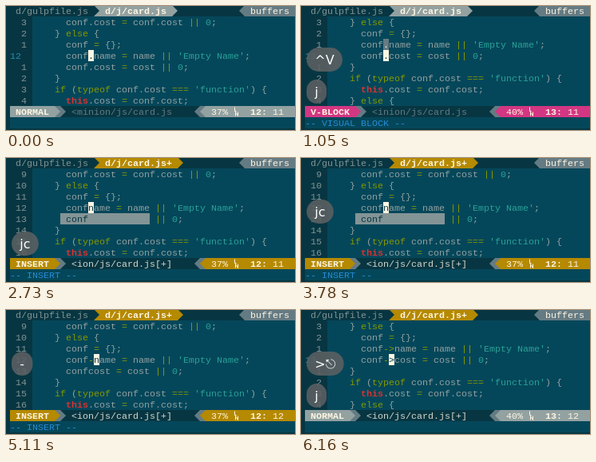
Animation, 362 px wide and 155 px high, one loop 7700 ms. Source, as an HTML page with a canvas:

```html
<!DOCTYPE html>
<html lang="en">
<head>
<meta charset="utf-8">
<title>Block editing in a terminal</title>
<style>
  html, body { margin: 0; width: 100%; height: 100%; overflow: hidden; background: #073642; }
  canvas { display: block; }
</style>
</head>
<body>
<canvas id="stage" width="362" height="155"></canvas>
<script>
const ctx = document.getElementById('stage').getContext('2d');
const W = 362, H = 155, CELL = 7, ROW = 14, LEFT = 5, LOOP = 7700;
const MONO = '"Liberation Mono", "DejaVu Sans Mono", monospace';
const KEYS = '16px "DejaVu Sans", sans-serif';
const C = {
  bg: '#05475a', dark: '#073642', text: '#93a1a1', num: '#839496', curNum: '#268bb2',
  op: '#859900', str: '#2aa198', self: '#dc322f', white: '#fdf6e3', grey: '#657b83',
  pale: '#93a1a1', gold: '#b58900', pink: '#d33682', blue: '#268bd2'
};
const MODE_COLOR = { 'NORMAL': C.pale, 'V-BLOCK': C.pink, 'INSERT': C.gold };

// Each step overrides part of the previous state.
const steps = [
  { at: 0, mode: 'NORMAL', cur: 12, col: 11, join: ['.', '.'], file: '<minion/js/card.js',
    msg: '', dirty: false, menu: false, up: '', low: '' },
  { at: 490, mode: 'V-BLOCK', file: '<inion/js/card.js', msg: '-- VISUAL BLOCK --', low: '^V' },
  { at: 980, up: '^V', low: '' },
  { at: 1050, cur: 13, low: 'j' },
  { at: 2310, low: 'jc' },
  { at: 2380, mode: 'INSERT', cur: 12, join: ['', ''], file: '<ion/js/card.js[+]',
    msg: '-- INSERT --', dirty: true, menu: true },
  { at: 2590, fade: 3 },
  { at: 3780, up: 'jc', low: '', fade: 0 },
  { at: 3850, col: 12, join: ['-', ''], menu: false, low: '-' },
  { at: 4410, fade: 4 },
  { at: 5110, up: '-', low: '', fade: 0 },
  { at: 5180, col: 13, join: ['->', ''], low: '>' },
  { at: 5600, low: '>⎋' },
  { at: 5670, msg: '', shift: -1 },
  { at: 5880, mode: 'NORMAL', col: 12, shift: 0, join: ['->', '->'], fade: 4 },
  { at: 6090, up: '>⎋', low: '', fade: 0 },
  { at: 6160, cur: 13, low: 'j' }
];

function stateAt(t) {
  const s = {};
  for (const step of steps) {
    if (step.at > t) break;
    Object.assign(s, step);
  }
  const done = Math.floor((t - s.at) / 70) + 1;
  s.upAlpha = s.fade ? Math.max(0, 1 - done / s.fade) : 1;
  return s;
}

const colX = col => LEFT + col * CELL;
const rowY = row => row * ROW - 1;

function fill(color, col, row, cells) {
  ctx.fillStyle = color;
  ctx.fillRect(colX(col), rowY(row), cells * CELL, ROW);
}

function print(str, col, row, color, bold) {
  ctx.font = (bold ? 'bold ' : '') + '11.667px ' + MONO;
  ctx.fillStyle = color;
  ctx.fillText(str, colX(col), rowY(row) + 11);
}

// Powerline separator: dir 1 points right, -1 points left.
function arrow(col, row, color, back, dir) {
  fill(back, col, row, 1);
  const base = dir > 0 ? colX(col) : colX(col + 1), y = rowY(row);
  ctx.fillStyle = color;
  ctx.beginPath();
  ctx.moveTo(base, y);
  ctx.lineTo(base + dir * CELL, y + ROW / 2);
  ctx.lineTo(base, y + ROW);
  ctx.fill();
}

function sourceLines(join) {
  return [
    '      conf.cost = conf.cost || 0;',
    '    } else {',
    '      conf = {};',
    `      conf${join[0]}name = name || 'Empty Name';`,
    `      conf${join[1]}cost = cost || 0;`,
    '    }',
    "    if (typeof conf.cost === 'function') {",
    '      this.cost = conf.cost;',
    '    } else {'
  ];
}

function tokenColor(tok) {
  if (tok[0] === "'" || /^\d/.test(tok)) return C.str;
  if (tok === 'this') return C.self;
  return /^(else|if|typeof|[=|>-]+)$/.test(tok) ? C.op : C.text;
}

function printCode(line, row) {
  const tokens = /'[^']*'|[a-z]+|\d+|[=|>-]+|[^\sa-z\d'=|>-]+/gi;
  for (const m of line.matchAll(tokens)) {
    print(m[0], 4 + m.index, row, tokenColor(m[0]), m[0] === 'this');
  }
}

function block(line, col, row, back, color) {
  fill(back, col + 3, row, 1);
  print(line[col - 1], col + 3, row, color);
}

function drawBuffer(s) {
  const first = s.cur - 3, lines = sourceLines(s.join);
  ctx.fillStyle = C.dark;
  ctx.fillRect(LEFT, rowY(1), 4 * CELL, 8 * ROW);
  for (let row = 1; row <= 8; row++) {
    const n = first + row - 1, here = n === s.cur;
    const relative = s.mode !== 'INSERT';
    const label = relative && !here ? Math.abs(n - s.cur) : n;
    const numCol = relative && here ? 0 : 3 - String(label).length;
    print(String(label), numCol, row, relative && here ? C.curNum : C.num);
    printCode(lines[n - 9], row);
  }
  if (s.mode === 'V-BLOCK' && s.cur === 13) block(lines[3], 11, 3, C.grey, C.white);
  block(lines[s.cur - 9], s.col + (s.shift || 0), 4, C.white, C.dark);
  if (s.menu) {
    fill('#839496', 9, 5, 16);
    print('conf', 10, 5, C.dark);
  }
}

function drawTabs(s) {
  const label = 'd/j/card.js' + (s.dirty ? '+' : '');
  const color = s.dirty ? C.gold : C.pale, end = 18 + label.length;
  ctx.fillStyle = C.dark;
  ctx.fillRect(LEFT, 0, W - LEFT, ROW - 1);
  print('d/gulpfile.js', 1, 0, '#839496');
  arrow(15, 0, C.dark, color, 1);
  fill(color, 16, 0, end - 16);
  print(label, 17, 0, C.white, true);
  arrow(end, 0, color, C.dark, 1);
  arrow(41, 0, C.grey, C.dark, -1);
  fill(C.grey, 42, 0, 9);
  print('buffers', 43, 0, C.white);
}

// Small "LN" line-number sign.
function lineSign(col, row) {
  const l = colX(col) + 1.5, y = rowY(row) + 1.5;
  ctx.strokeStyle = C.white;
  ctx.lineWidth = 1;
  ctx.beginPath();
  ctx.moveTo(l, y);
  ctx.lineTo(l, y + 5);
  ctx.lineTo(l + 2, y + 5);
  ctx.moveTo(l + 1, y + 11);
  ctx.lineTo(l + 1, y + 6);
  ctx.lineTo(l + 4, y + 11);
  ctx.lineTo(l + 4, y + 6);
  ctx.stroke();
}

function drawStatus(s) {
  const color = MODE_COLOR[s.mode], end = s.mode.length + 2;
  fill(C.dark, 0, 9, 51);
  fill(color, 0, 9, end);
  print(s.mode, 1, 9, C.white, true);
  arrow(end, 9, color, C.grey, 1);
  arrow(end + 1, 9, C.grey, C.dark, 1);
  print(s.file, end + 3, 9, s.dirty ? '#d5d8cc' : C.grey);
  arrow(33, 9, C.grey, C.dark, -1);
  arrow(34, 9, color, C.grey, -1);
  fill(color, 35, 9, 16);
  print(s.cur === 12 ? '37%' : '40%', 36, 9, C.white);
  lineSign(40, 9);
  print(s.cur + ':', 43, 9, C.white, true);
  print(String(s.col), 47, 9, C.white);
  print(s.msg, 0, 10, C.blue);
}

function bubble(keys, y, alpha) {
  if (!keys || !alpha) return;
  ctx.save();
  ctx.globalAlpha = alpha;
  ctx.font = KEYS;
  const w = ctx.measureText(keys).width + 20.6;
  ctx.fillStyle = 'rgba(92, 96, 98, 0.88)';
  ctx.beginPath();
  ctx.roundRect(7, y, w, 30, Math.min(15, w / 2));
  ctx.fill();
  ctx.fillStyle = '#fff';
  ctx.fillText(keys, 17.3, y + 21);
  ctx.restore();
}

function draw(t) {
  const s = stateAt(t);
  ctx.fillStyle = C.dark;
  ctx.fillRect(0, 0, W, H);
  ctx.fillStyle = C.bg;
  ctx.fillRect(LEFT, 0, W - LEFT, rowY(11));
  drawBuffer(s);
  drawTabs(s);
  drawStatus(s);
  bubble(s.up, 52, s.upAlpha);
  bubble(s.low, 92, 1);
}

let start;
function tick(now) {
  start ??= now;
  draw((now - start) % LOOP);
  requestAnimationFrame(tick);
}
draw(0);
requestAnimationFrame(tick);
</script>
</body>
</html>
```
